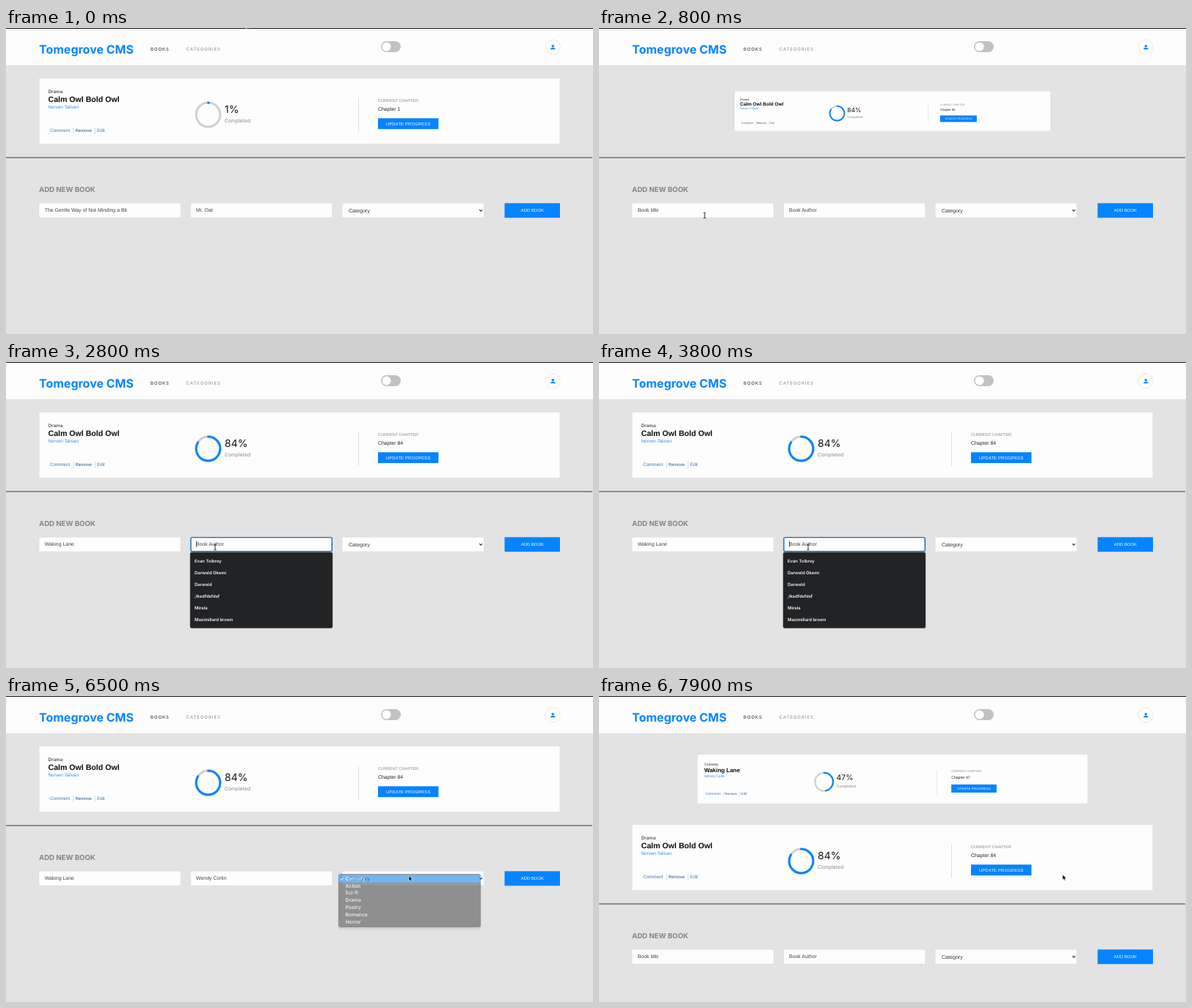
An HTML page that plays this animation: 800x418 px, repeating every 8 s.

```html
<!DOCTYPE html>
<html lang="en">
<head>
<meta charset="utf-8">
<title>Book list</title>
<style>
  html, body { margin: 0; width: 100%; height: 100%; overflow: hidden; background: #e3e3e3; }
  svg { display: block; width: 100%; height: 100%; }
  text { font-family: "Liberation Sans", Arial, sans-serif; text-rendering: geometricPrecision; white-space: pre; }
  .geo { font-family: Inter, sans-serif; }
  .bold { font-weight: 700; }
  .field { font-size: 6.95px; fill: #444; }
</style>
</head>
<body>
<svg id="stage" viewBox="0 0 800 418" xmlns="http://www.w3.org/2000/svg"></svg>
<script>
const LOOP = 8000, ROW = 107, BLUE = '#0684ff', PAPER = '#fdfdfd';
const CARD_X = 400, CARD_Y = 113.5;

const label = (x, y, size, fill, str, extra = '') =>
  `<text x="${x}" y="${y}" font-size="${size}" fill="${fill}" ${extra}>${str}</text>`;
const rect = (x, y, w, h, fill, extra = '') =>
  `<rect x="${x}" y="${y}" width="${w}" height="${h}" fill="${fill}" ${extra}/>`;

function card(id, genre, title, author) {
  return `<g id="${id}"><g class="zoom">
    ${rect(45.5, 69, 709, 89, PAPER)}
    ${label(57.5, 89.2, 6.3, '#555', genre, 'class="geo" font-weight="600"')}
    ${label(57.5, 101, 10.6, '#0c0c0c', title, 'class="bold"')}
    ${label(57.5, 110, 6.3, '#2f8df0', author)}
    ${label(60, 142.2, 6.3, '#3a78b4', 'Comment')}
    ${label(94.5, 142.2, 6, '#1c5591', 'Remove')}
    ${label(124, 142.2, 6.3, '#3a78b4', 'Edit')}
    ${rect(91.6, 136, 0.7, 9, '#c8c8c8')}${rect(120.9, 136, 0.7, 9, '#c8c8c8')}
    <g fill="none" stroke-width="3">
      <circle cx="275.5" cy="118.5" r="16.4" stroke="#cfcfcf"/>
      <circle class="ring" cx="275.5" cy="118.5" r="16.4" stroke="${BLUE}" pathLength="100"
        stroke-linecap="round" transform="rotate(-90 275.5 118.5)"/>
    </g>
    ${label(298, 115.5, 14, '#161616', '', 'class="geo pct"')}
    ${label(298, 128.5, 6.8, '#888', 'Completed', 'class="geo"')}
    ${rect(480, 96, 0.8, 46, '#d6d6d6')}
    ${label(507, 101, 5.55, '#888', 'CURRENT CHAPTER')}
    ${label(507, 113, 6.9, '#222', '', 'class="chapter"')}
    ${rect(507, 123.3, 82.4, 14.8, BLUE)}
    ${label(548.2, 132.8, 5.8, '#fff', 'UPDATE PROGRESS', 'text-anchor="middle" letter-spacing=".2"')}
  </g></g>`;
}

const header = `
  ${rect(0, 0, 800, 52, PAPER)}
  ${rect(0, 51.2, 800, 0.8, '#d9d9d9')}
  ${rect(0, 0, 800, 1, '#111')}
  ${label(45, 35, 16, BLUE, 'Tomegrove CMS', 'class="geo bold"')}
  ${label(197, 31.3, 6, '#222', 'BOOKS', 'class="geo" letter-spacing="1"')}
  ${label(245.5, 31.3, 6, '#888', 'CATEGORIES', 'class="geo" letter-spacing="1"')}
  ${rect(511, 18, 27, 15, '#c2c2c2', 'rx="7.5"')}
  <circle cx="518.6" cy="25.5" r="6" fill="#fff"/>
  <circle cx="745.3" cy="26" r="10" fill="${PAPER}" stroke="#e2e2e2" stroke-width=".8"/>
  <circle cx="745.3" cy="24.8" r="1.8" fill="${BLUE}"/>
  <path d="M742 29.2q0-2.2 2.4-2.2h1.8q2.4 0 2.4 2.2z" fill="${BLUE}"/>`;

const box = x => rect(x, 239.3, 193, 19.7, PAPER, 'rx="1" stroke="#dadada" stroke-width=".5"');
const names = ['Evan Tolbrey', 'Darweld Okemi', 'Darweld', ';lksdfdsfdsf', 'Mirela', 'Maximillard brown'];
const genres = ['Comedy', 'Action', 'Sci-fi', 'Drama', 'Poetry', 'Romance', 'Horror'];

const form = `<g id="form">
  ${rect(0, 176.5, 799, 1, '#3a3a3a')}
  ${label(45, 223.6, 9.6, '#858585', 'ADD NEW BOOK', 'class="geo bold"')}
  ${box(45)}${box(251.6)}${box(458.2)}
  <rect id="focus" y="239.6" width="192.4" height="19.2" rx="2" fill="none" stroke="#1a66ab" stroke-width="1.4"/>
  <text id="title" class="field" x="52.7" y="251"/>
  <text id="author" class="field" x="259" y="251"/>
  <rect id="caret" y="244.3" width=".7" height="8.4" fill="#222"/>
  ${label(467, 251.6, 7.1, '#333', '', 'id="genre"')}
  <path d="M645.2 248.2l1.9 2 1.9-2" fill="none" stroke="#333" stroke-width="1.1"/>
  ${rect(679.5, 239.3, 75.5, 19.9, BLUE)}
  ${label(717.4, 251.2, 5.9, '#fff', 'ADD BOOK', 'text-anchor="middle"')}
</g>`;

const popups = `
  <g id="names">
    ${rect(251, 260, 194, 103.5, '#222325', 'rx="2" stroke="#4a4a4a" stroke-width=".5"')}
    ${names.map((n, i) => label(257, 274 + 16 * i, 5.9, '#f4f4f4', n, 'class="geo" font-weight="600"')).join('')}
  </g>
  <g id="menu">
    ${rect(452, 244, 196, 75, '#000', 'rx="4" opacity=".1"')}
    ${rect(453, 243, 194, 73, '#626262', 'rx="3"')}
    ${rect(453, 244.5, 194, 10.2, '#2391f0')}
    <path d="M455.8 249.8l1.4 1.8 2.6-4" fill="none" stroke="#fff" stroke-width=".9"/>
    ${genres.map((g, i) => label(462.5, 251.7 + 9.85 * i, 6.8, '#fff', g, 'class="geo" font-weight="500"')).join('')}
  </g>`;

const pointers = `
  <path id="arrow" d="M0 0V7.2L1.7 5.7L2.8 8.2L4.1 7.6L3 5.2H5.2Z" fill="#000" stroke="#fff" stroke-width=".6"/>
  <path id="beam" d="M-1.6-3.8Q0-3.8 0-2.8Q0-3.8 1.6-3.8M0-2.8V2.8M-1.6 3.8Q0 3.8 0 2.8Q0 3.8 1.6 3.8"
    fill="none" stroke="#111" stroke-width=".9"/>`;

const $ = id => document.getElementById(id);
$('stage').innerHTML =
  rect(0, 0, 800, 418, '#e3e3e3') + header +
  card('fresh', 'Comedy', 'Waking Lane', 'Wendy Corlin') +
  card('first', 'Drama', 'Calm Owl Bold Owl', 'Norven Talivari') +
  form + popups + rect(0, 1, 800, 417, '#fff', 'id="blank"') + pointers;

// Timeline, in ms
const BLANK = 150, RELOADED = 300, CARD_IN = 450;
const TITLE_FOCUS = 1550, AUTHOR_FOCUS = 2750, AUTHOR_BLUR = 5600;
const MENU_OPEN = 5650, MENU_FADE = 6420, MENU_GONE = 6650, ADDED = 7450;

const run = (start, count, step = 100) => Array.from({ length: count }, (_, i) => start + i * step);
const titleKeys = [...run(1655, 4, 45), ...run(1880, 7)];
const authorKeys = [...run(3950, 6), 4650, ...run(4850, 5)];
const typed = (str, keys, t) => str.slice(0, keys.filter(k => k <= t).length);

const path = [
  [0, 327, -6], [150, 327, -6], [780, 144, 256], [1100, 144, 256], [1500, 137, 255],
  [2550, 137, 255], [2780, 285, 253], [5300, 285, 253], [5600, 549, 245.5],
  [6650, 549, 245.5], [7150, 716, 250], [7300, 716, 250], [7600, 631.8, 244], [LOOP, 631.8, 244]
];

const between = (t, a, b) => t >= a && t < b;
const show = (id, on) => $(id).setAttribute('display', on ? 'inline' : 'none');
const move = (id, x, y) => $(id).setAttribute('transform', `translate(${x} ${y})`);
const clamp = v => Math.min(1, Math.max(0, v));

// cubic-bezier(.25, .1, .25, 1)
function ease(p) {
  if (p <= 0 || p >= 1) return clamp(p);
  const curve = (u, a, b) => 3 * u * (1 - u) ** 2 * a + 3 * u * u * (1 - u) * b + u ** 3;
  let lo = 0, hi = 1;
  for (let i = 0; i < 24; i++) {
    const mid = (lo + hi) / 2;
    if (curve(mid, 0.25, 0.25) < p) lo = mid; else hi = mid;
  }
  return curve(lo, 0.1, 1);
}

function setCard(id, y, scale, percent) {
  const el = $(id), find = c => el.querySelector(c);
  show(id, scale > 0);
  move(id, 0, y);
  find('.zoom').setAttribute('transform',
    `translate(${CARD_X} ${CARD_Y}) scale(${scale}) translate(${-CARD_X} ${-CARD_Y})`);
  find('.ring').setAttribute('stroke-dasharray', `${percent} 200`);
  find('.pct').textContent = percent + '%';
  find('.chapter').textContent = 'Chapter ' + percent;
}

function setForm(t) {
  const old = t < BLANK, done = t >= ADDED;
  const title = done ? '' : old ? 'The Gentle Way of Not Minding a Bit' : typed('Waking Lane', titleKeys, t);
  const author = done ? '' : old ? 'Mr. Oat' : typed('Wendy Corlin', authorKeys, t);
  $('title').textContent = title || 'Book title';
  $('author').textContent = author || 'Book Author';
  $('genre').textContent = between(t, 6600, ADDED) ? 'Comedy' : 'Category';

  const inAuthor = t >= AUTHOR_FOCUS;
  const focused = between(t, TITLE_FOCUS, AUTHOR_BLUR);
  show('focus', focused);
  $('focus').setAttribute('x', inAuthor ? 251.9 : 45.3);

  const field = $(inAuthor ? 'author' : 'title'), value = inAuthor ? author : title;
  const lastKey = [AUTHOR_FOCUS, ...titleKeys, ...authorKeys].filter(k => k <= t).reduce((a, b) => Math.max(a, b), 0);
  show('caret', focused && (value || inAuthor) && (t - lastKey) % 1000 < 500);
  $('caret').setAttribute('x', +field.getAttribute('x') + (value ? field.getComputedTextLength() : 0) + 0.2);
}

function setPointer(t) {
  const i = path.findIndex(p => p[0] > t), [t0, x0, y0] = path[i - 1], [t1, x1, y1] = path[i];
  const p = (t - t0) / (t1 - t0), k = p * p * (3 - 2 * p);
  const x = x0 + (x1 - x0) * k, y = y0 + (y1 - y0) * k;
  const visible = !between(t, 1650, 2550) && !between(t, 3950, 5300);
  const overField = t < ADDED && between(y, 239, 260) && (between(x, 45, 238) || between(x, 252, 445));
  show('beam', visible && overField);
  show('arrow', visible && !overField);
  move('beam', x, y);
  move('arrow', x, y);
}

function draw(t) {
  const empty = between(t, BLANK, CARD_IN);
  const rows = empty ? -1 : t >= ADDED ? 1 : 0;
  const old = t < BLANK;
  setCard('first', Math.max(0, rows) * ROW, old ? 1 : ease((t - CARD_IN) / 1000), old ? 1 : 84);
  setCard('fresh', 0, ease((t - ADDED) / 1000), 47);
  move('form', 0, rows * ROW);
  setForm(t);
  show('names', between(t, AUTHOR_FOCUS, authorKeys[0]));
  show('menu', between(t, MENU_OPEN, MENU_GONE));
  $('menu').setAttribute('opacity', 1 - clamp((t - MENU_FADE) / (MENU_GONE - MENU_FADE)));
  show('blank', between(t, BLANK, RELOADED));
  setPointer(t);
}

const begin = performance.now();
function tick() {
  draw((performance.now() - begin) % LOOP);
  requestAnimationFrame(tick);
}
tick();
</script>
</body>
</html>
```
